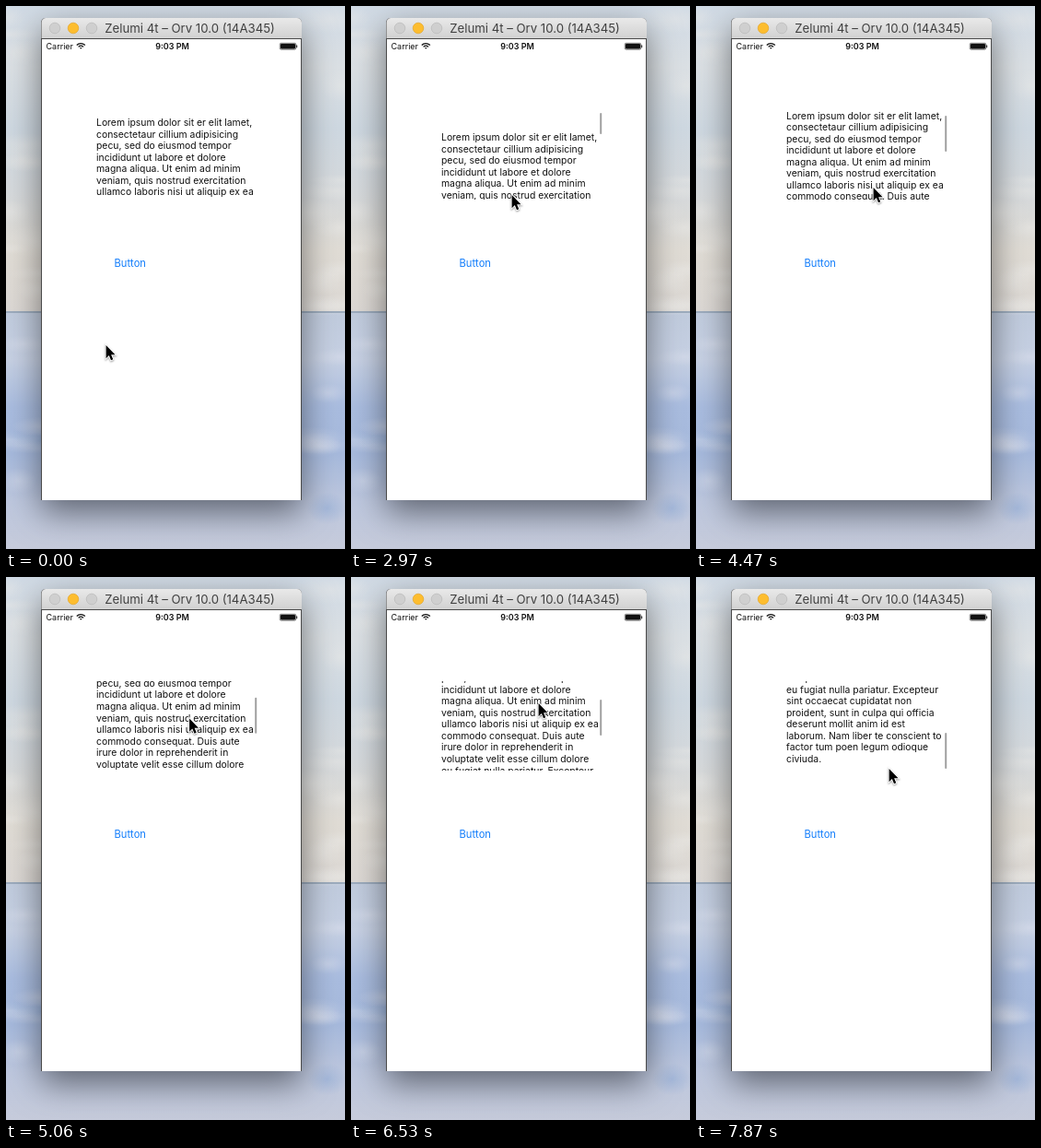
Recreate the animation shown at these times as an HTML page with a canvas. Size 368 by 589 pixels, loop 8 s.

```html
<!DOCTYPE html>
<html lang="en">
<head>
<meta charset="utf-8">
<title>Scrolling text view</title>
<style>
  html, body { margin: 0; width: 100%; height: 100%; overflow: hidden; }
  canvas { display: block; }
</style>
</head>
<body>
<canvas id="stage" width="368" height="589"></canvas>
<script>
const W = 368, H = 589, LOOP = 8000;
const START = 1637, STEP = 148, LAST_STEP = 42;
const HORIZON = 332;
const FONT = 'Inter, "Liberation Sans", sans-serif';
const VIEW = { x: 98, top: 113, bottom: 210, baseline: 130, leading: 12.56 };
const stage = document.getElementById('stage').getContext('2d');

const LINES = [
  'Lorem ipsum dolor sit er elit lamet,',
  'consectetaur cillium adipisicing',
  'pecu, sed do eiusmod tempor',
  'incididunt ut labore et dolore',
  'magna aliqua. Ut enim ad minim',
  'veniam, quis nostrud exercitation',
  'ullamco laboris nisi ut aliquip ex ea',
  'commodo consequat. Duis aute',
  'irure dolor in reprehenderit in',
  'voluptate velit esse cillum dolore',
  'eu fugiat nulla pariatur. Excepteur',
  'sint occaecat cupidatat non',
  'proident, sunt in culpa qui officia',
  'deserunt mollit anim id est',
  'laborum. Nam liber te conscient to',
  'factor tum poen legum odioque',
  'civiuda.'
];

// Turning points of the gesture, eased in between
const GESTURE = [
  { step: 0, x: 125, y: 324, scroll: 0 },
  { step: 6, x: 172, y: 174, scroll: 0 },
  { step: 9, x: 174, y: 204, scroll: -16 },
  { step: 17, x: 190, y: 215, scroll: 0 },
  { step: 19, x: 192, y: 196, scroll: 7.5 },
  { step: 27, x: 205, y: 109, scroll: 65 },
  { step: 33, x: 203, y: 136, scroll: 42 },
  { step: 38, x: 209, y: 207, scroll: 125 },
  { step: LAST_STEP, x: 209, y: 207, scroll: 130 }
];

const mix = (a, b, u) => a + (b - a) * u;
const ease = u => u * u * (3 - 2 * u);

function poseAt(step) {
  const next = Math.max(1, GESTURE.findIndex(key => key.step >= step));
  const a = GESTURE[next - 1], b = GESTURE[next];
  const u = ease((step - a.step) / (b.step - a.step));
  return { x: mix(a.x, b.x, u), y: mix(a.y, b.y, u), scroll: mix(a.scroll, b.scroll, u) };
}

function seeded(seed) {
  return () => (seed = (seed * 16807) % 2147483647) / 2147483647;
}

// Evenly spaced colours from y0 to y1
function vertical(c, y0, y1, colors) {
  const g = c.createLinearGradient(0, y0, 0, y1);
  colors.forEach((color, i) => g.addColorStop(i / (colors.length - 1), color));
  return g;
}

function fillBand(c, y0, y1, colors) {
  c.fillStyle = vertical(c, y0, y1, colors);
  c.fillRect(0, y0, W, y1 - y0);
}

function glow(c, x, y, rx, ry, rgb, alpha) {
  c.save();
  c.translate(x, y);
  c.scale(rx, ry);
  const g = c.createRadialGradient(0, 0, 0, 0, 0, 1);
  g.addColorStop(0, `rgba(${rgb},${alpha})`);
  g.addColorStop(1, `rgba(${rgb},0)`);
  c.fillStyle = g;
  c.fillRect(-1, -1, 2, 2);
  c.restore();
}

function label(c, text, x, y, font, color, align = 'left') {
  c.font = `${font} ${FONT}`;
  c.fillStyle = color;
  c.textAlign = align;
  c.fillText(text, x, y);
}

function disc(c, x, y, r, fill, edge) {
  c.beginPath();
  c.arc(x, y, r, 0, Math.PI * 2);
  c.fillStyle = fill;
  c.fill();
  c.strokeStyle = edge;
  c.lineWidth = 0.7;
  c.stroke();
}

function paintLandscape(c) {
  fillBand(c, 0, HORIZON, ['#d0dae5', '#dbe0e4', '#ced8e1', '#d5d9dc', '#e0dcd5', '#dcd8d4']);
  fillBand(c, HORIZON, H, ['#c0cbdd', '#c6d0e3', '#a9bcdf', '#a6b9dc', '#bdc7de', '#c6cbdb']);
  const random = seeded(11);
  for (let i = 0; i < 36; i++) {
    const x = i % 2 ? mix(325, W, random()) : mix(0, 38, random());
    const y = random() * H;
    const tint = y < HORIZON ? '236,235,232' : i % 3 ? '222,226,238' : '125,160,212';
    glow(c, x, y, mix(20, 40, random()), mix(6, 18, random()), tint, 0.4);
  }
  c.fillStyle = '#9cabbd';
  c.fillRect(0, HORIZON - 1, W, 2);
}

function paintWindow(c) {
  c.save();
  c.shadowColor = 'rgba(0,0,0,.5)';
  c.shadowBlur = 36;
  c.shadowOffsetY = 13;
  c.fillStyle = '#4a4a4a';
  c.beginPath();
  c.roundRect(38, 13, 283, 523, [5, 5, 0, 0]);
  c.fill();
  c.restore();

  c.fillStyle = vertical(c, 13, 35, ['#e9e9e9', '#d1d1d1']);
  c.beginPath();
  c.roundRect(38.5, 13, 282.5, 22, [5, 5, 0, 0]);
  c.fill();
  c.fillStyle = '#fff';
  c.fillRect(39, 36, 281, 500);

  disc(c, 53, 24, 5.8, '#cfcfcf', '#b9b9b9');
  disc(c, 73, 24, 5.8, '#fdbd2f', '#e2a52a');
  disc(c, 93, 24, 5.8, '#cfcfcf', '#b9b9b9');
  label(c, 'Zelumi 4t – Orv 10.0 (14A345)', 199.5, 29, '13.2px', '#404040', 'center');
}

function paintStatusBar(c) {
  label(c, 'Carrier', 43.5, 47, '9px', '#111');
  label(c, '9:03 PM', 180.5, 47, '600 9px', '#111', 'center');

  c.strokeStyle = '#111';
  c.lineWidth = 1.3;
  for (const r of [1.1, 3.6, 6.2]) {
    c.beginPath();
    c.arc(81.3, 46.8, r, -Math.PI * 0.76, -Math.PI * 0.24);
    c.stroke();
  }

  c.fillStyle = '#111';
  c.lineWidth = 0.6;
  c.beginPath();
  c.roundRect(297.3, 40.3, 17.4, 6.8, 1.3);
  c.stroke();
  c.beginPath();
  c.roundRect(298, 41, 16, 5.4, 0.8);
  c.roundRect(315.2, 42.2, 1, 3, 0.5);
  c.fill();
}

function paintText(c, scroll) {
  c.save();
  c.beginPath();
  c.rect(VIEW.x - 4, VIEW.top, 180, VIEW.bottom - VIEW.top);
  c.clip();
  LINES.forEach((line, i) => {
    label(c, line, VIEW.x, VIEW.baseline + i * VIEW.leading - scroll, '10.4px', '#111');
  });
  c.restore();
}

// The bar shrinks by the overscroll at the top
function paintScrollbar(c, scroll) {
  c.fillStyle = '#a0a0a0';
  c.beginPath();
  c.roundRect(270.2, 116 + Math.max(0, scroll) * 0.407, 2, 39 + Math.min(0, scroll), 1);
  c.fill();
}

const ARROW = new Path2D('M0 0V15.2L3.5 11.9 5.9 17.4 8.3 16.4 6 11H10.8Z');

function paintPointer(c, x, y) {
  c.save();
  c.translate(x + 0.6, y + 0.9);
  c.scale(0.92, 0.94);
  c.shadowColor = 'rgba(0,0,0,.4)';
  c.shadowBlur = 2;
  c.shadowOffsetY = 1;
  c.strokeStyle = '#fff';
  c.lineWidth = 2;
  c.stroke(ARROW);
  c.shadowColor = 'transparent';
  c.fillStyle = '#000';
  c.fill(ARROW);
  c.restore();
}

const backdrop = document.createElement('canvas');
backdrop.width = W;
backdrop.height = H;

function paintBackdrop() {
  const c = backdrop.getContext('2d');
  paintLandscape(c);
  paintWindow(c);
  paintStatusBar(c);
  label(c, 'Button', 117.5, 283, '11.2px', '#147efb');
}

function render(t) {
  const step = Math.min(LAST_STEP, Math.floor((t - START) / STEP));
  const { x, y, scroll } = step < 0 ? { x: 108, y: 367, scroll: 0 } : poseAt(step);
  stage.drawImage(backdrop, 0, 0);
  paintText(stage, scroll);
  if (step > 6) paintScrollbar(stage, scroll);
  paintPointer(stage, x, y);
}

function tick() {
  render(performance.now() % LOOP);
  requestAnimationFrame(tick);
}

paintBackdrop();
tick();
</script>
</body>
</html>
```
